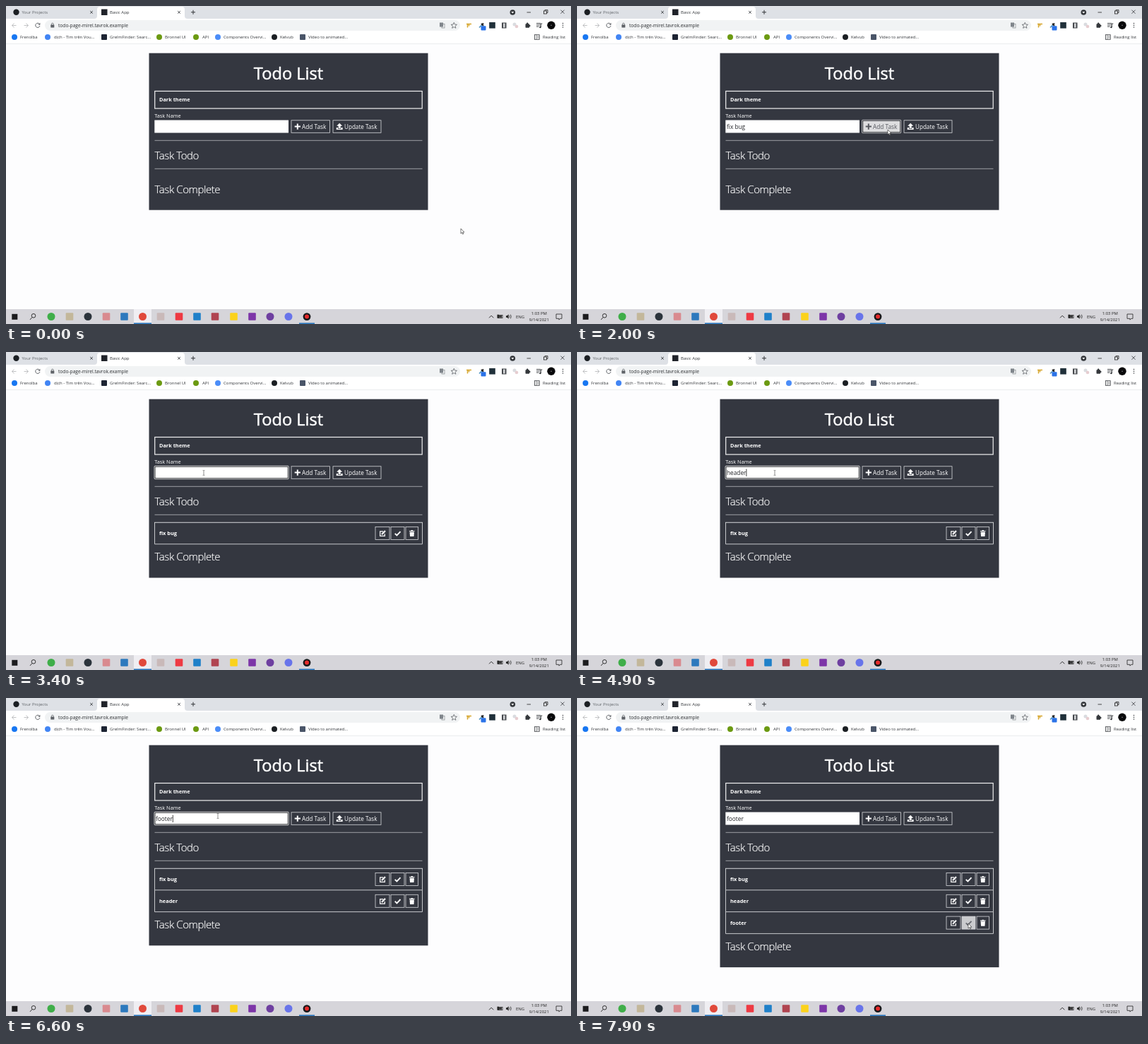
An HTML page that plays this animation: 800x450 px, repeating every 8000 ms.

```html
<!DOCTYPE html>
<html lang="en">
<head>
<meta charset="utf-8">
<title>Todo List</title>
<style>
  html, body { margin: 0; width: 100%; height: 100%; overflow: hidden; background: #fdfdfe; }
  svg { display: block; width: 800px; height: 450px; font-family: "Open Sans", "Noto Sans", sans-serif; }
  text { white-space: pre; }
  .title { font-weight: 500; stroke: #fff; stroke-width: .5; stroke-linejoin: round; }
  .heading { font-weight: 300; letter-spacing: -.4px; stroke: #fff; stroke-width: .2; }
</style>
</head>
<body>
<svg id="stage" viewBox="0 0 800 450" xmlns="http://www.w3.org/2000/svg"></svg>
<script>
const DARK = '#343740', INK = '#34373b', GREY = '#5f6368', EDGE = '#d6d8db';

const rect = (x, y, w, h, fill, more = '') =>
  `<rect x="${x}" y="${y}" width="${w}" height="${h}" fill="${fill}" ${more}/>`;
const box = (x, y, w, h, color, weight = 1, more = '') =>
  rect(x, y, w, h, 'none', `stroke="${color}" stroke-width="${weight}" ${more}`);
const dot = (x, y, r, fill, more = '') => `<circle cx="${x}" cy="${y}" r="${r}" fill="${fill}" ${more}/>`;
const line = (d, color = INK, weight = 1, more = '') =>
  `<path d="${d}" fill="none" stroke="${color}" stroke-width="${weight}" ${more}/>`;
const shape = (d, fill, more = '') => `<path d="${d}" fill="${fill}" ${more}/>`;
const text = (x, y, size, str, fill = INK, more = '') =>
  `<text x="${x}" y="${y}" font-size="${size}" fill="${fill}" ${more}>${str}</text>`;
const at = (x, y, body, more = '') => `<g transform="translate(${x} ${y})" ${more}>${body}</g>`;

const cross = (x, y, r, w = .9) => line(`M${x - r} ${y - r}l${2 * r} ${2 * r}m0 ${-2 * r}l${-2 * r} ${2 * r}`, INK, w);
const plus = (x, y, r, w) => line(`M${x - r} ${y}h${2 * r}M${x} ${y - r}v${2 * r}`, INK, w);

function browser() {
  const marks = [
    [20, 'Frenolba', '#1877f2', 12], [68, 'dịch - Tìm trên Vou...', '#4285f4', 59],
    [147, 'GrelmFinder: Searc...', '#1d2433', 139, 1], [225, 'Bronnel UI', '#6c9a12', 217],
    [278, 'API', '#6c9a12', 269], [308, 'Components Overvi...', '#4b8df8', 300],
    [388, 'Kelvub', '#1b1f23', 380], [428, 'Video to animated...', '#4a5568', 420, 1]
  ];
  const arrow = (x, s, c) => line(`M${x + 3 * s} 27.5h${-6 * s}m${3 * s} -3l${-3 * s} 3l${3 * s} 3`, c, .9);
  return rect(0, 0, 800, 18, '#dee1e6')
    + shape('M125 18Q129 18 129 14V5Q129 1 133 1H249Q253 1 253 5V14Q253 18 257 18Z', '#fff')
    + dot(14.5, 8.7, 4.2, '#1b1f23') + text(22.5, 11, 6, 'Your Projects', GREY)
    + rect(135, 4.5, 8.5, 8.5, '#20232a') + text(147, 11, 6.1, 'Basic App')
    + cross(121, 8.8, 1.8) + cross(245, 8.8, 1.8) + plus(265, 8.8, 3, 1)
    + dot(717.3, 9, 3.8, INK) + shape('M715.3 8h4l-2 2.6z', '#fff')
    + line('M737.5 9h5.5', '#222', .8) + box(761.5, 7, 4, 4, '#222', .8)
    + line('M763 7V5.6h4V9.6h-1.5', '#222', .8) + cross(788, 8.2, 2.6, .8)
    + rect(0, 18, 800, 35, '#fff')
    + rect(55, 20, 588, 15, '#f1f3f4', 'rx="7.5"')
    + arrow(11.5, 1, '#babcbe') + arrow(28.5, -1, '#babcbe')
    + line('M47.3 25.4A3.1 3.1 0 1 0 47.9 28', GREY, 1) + shape('M48.4 23.8v3h-3z', GREY)
    + rect(63.3, 26.6, 5, 4, GREY, 'rx=".6"') + line('M64.4 27v-1.4a1.4 1.4 0 0 1 2.8 0V27', GREY, .8)
    + text(74, 29.8, 6.65, 'todo-page-mirel.tavrok.example', '#2b2e31')
    + rect(614, 23.5, 5, 6, '#80868b') + box(617, 25.5, 4, 5.5, '#80868b', .7)
    + shape('M634.3 23.3l1.2 2.8 3 .2-2.3 2 .7 3-2.6-1.6-2.6 1.6.7-3-2.3-2 3-.2z', 'none', `stroke="${GREY}" stroke-width=".8"`)
    + line('M652 25.5h7M653.5 25.5v5M655.5 25.5v3', '#d6a52c', 1.5)
    + line('M670 30.5l4-4', '#4a90c2', 1.6) + line('M673 25l3 3M674 26.5l2-2', '#222', 1.8)
    + rect(672.5, 28.2, 7, 6.3, '#2b73e8', 'rx="1"')
    + rect(684.2, 23, 8.6, 8.6, '#20303a')
    + rect(702, 23.5, 6.5, 8, '#45484d') + rect(704, 24.5, 2.6, 6, '#d5d7d9')
    + dot(720, 26, 2.5, '#dadce0') + dot(723, 29, 2.3, '#e6cdd0')
    + rect(735.5, 25.2, 5.6, 5.6, INK, 'rx=".7"') + dot(738.2, 24.9, 1.3, INK) + dot(741.2, 28, 1.3, INK)
    + line('M751 24.5h6M751 26.8h6M751 29.1h3.5', INK, .9) + line('M757.3 30V25h2', INK, 1) + dot(756.4, 30, 1.2, INK)
    + dot(772, 27.3, 5.7, '#08080a') + dot(772, 27.3, .8, '#8b8b90')
    + [24.6, 27.3, 30].map(y => dot(788.5, y, .75, INK)).join('')
    + marks.map(([x, name, color, ix, square]) =>
        (square ? rect(ix - 4, 40, 8, 8, color, 'rx="1"') : dot(ix, 44, 4, color)) + text(x, 46.2, 6, name)).join('')
    + box(748.6, 40.7, 6.6, 6.6, INK, .8) + line('M751 41v6M752 42.8h2.5M752 45h2.5', INK, .6)
    + text(760, 46.2, 6, 'Reading list')
    + rect(0, 53, 800, .7, '#e3e5e8');
}

function taskbar() {
  const apps = [
    [64, '#3fae49'], [90, '#c3b79a', 1], [116, '#2c343c'], [142, '#d98a8f', 1], [167.5, '#2c79bd', 1],
    [193.5, '#e0493b'], [219, '#c9b9b9', 1], [245, '#ee3a43', 1], [270.5, '#1f80c9', 1],
    [296, '#b04450', 1], [322.5, '#fbd21b', 1], [348.5, '#7d35a8', 1], [374, '#6e3fa0'], [400, '#6874ea']
  ];
  return rect(0, 429, 800, 21, '#d6d5da')
    + rect(181, 429, 25, 21, '#efeef2') + rect(181, 448.4, 25, 1.6, '#2a76bd') + rect(415, 448.4, 22, 1.6, '#2a76bd')
    + rect(8.3, 435.8, 8, 8, '#1c1c1e')
    + dot(39, 438.3, 2.8, 'none', 'stroke="#222" stroke-width=".9"') + line('M37 440.5l-3 3.4', '#222', .9)
    + apps.map(([x, c, sq]) => sq ? rect(x - 5.3, 434.2, 10.6, 10.6, c, 'rx="1"') : dot(x, 439.5, 5.5, c)).join('')
    + dot(426, 439.6, 5.4, '#17181a') + dot(426, 439.6, 3, '#e52b2b')
    + line('M684 441.3l3.2-3.2 3.2 3.2', '#222', .9)
    + box(697, 437.4, 6, 4, '#222', .8) + rect(698, 438.2, 4, 2.4, '#222') + rect(695.5, 436.7, 2.4, 5, '#222')
    + shape('M708 438.2h1.6l2-1.9v6.4l-2-1.9h-1.6z', '#222')
    + line('M712.8 437.8q1.2 1.7 0 3.4M714.3 436.6q2.2 2.9 0 5.8', '#222', .7)
    + text(722, 441.8, 6, 'ENG', '#222')
    + text(754.8, 437.2, 5.9, '1:03 PM', '#222', 'text-anchor="middle"')
    + text(754.8, 446.3, 5.9, '9/14/2021', '#222', 'text-anchor="middle"')
    + line('M779 436h8v6.3h-2.4l-1.6 1.8v-1.8h-4z', '#222', .8);
}

const ROW = 30.8;
const icons = {
  edit: line('M1 -2.8h-4.3v6.6h6.6V.6', '#fff', 1.2) + line('M-1 1.5L4 -3.5', '#fff', 2.2),
  check: line('M-3.8 .2l2.7 2.7L4 -2.4', 'currentColor', 1.9),
  trash: shape('M-3.7 -3.7h2.3l.5-.8h1.8l.5.8h2.3v1.2h-7.4zM-3.2 -1.9h6.4l-.5 6.4h-5.4z', '#fff')
};

function taskRow(name, i) {
  const btn = (x, w, icon) => box(x, 247.5, w, 18, EDGE, .8) + at(x + w / 2, 256.6, icons[icon]);
  return `<g id="row${i}" transform="translate(0 ${i * ROW})">`
    + (i ? '' : line('M210 241.2H590', EDGE, 1.1))
    + line('M210.5 241V271.8H589.5V241', EDGE, .9)
    + text(217, 259.4, 7.4, name, '#fff', 'font-weight="700"')
    + btn(523, 20, 'edit')
    + `<g id="check${i}" color="#fff">` + rect(545, 247.5, 19, 18, '#fff', 'fill-opacity="0"') + btn(545, 19, 'check') + '</g>'
    + btn(566, 17.5, 'trash') + '</g>';
}

function app() {
  const ring = (id, x, w, color) => `<g id="${id}">`
    + box(x - .2, 161.3, w + .4, 18.4, color, .9, 'rx="1"') + box(x + .7, 162.2, w - 1.4, 16.6, '#15171b', .9) + '</g>';
  const white = '#fff';
  return rect(202.5, 66.7, 395, 222, DARK, 'id="panel"')
    + text(400, 103.6, 23.6, 'Todo List', white, 'class="title" text-anchor="middle"')
    + box(210.7, 120.5, 378.5, 24.5, '#f0f0f1', 1.2)
    + text(217, 135.3, 7.35, 'Dark theme', white, 'font-weight="700"')
    + text(210.3, 158.2, 7.35, 'Task Name', white)
    + rect(210.3, 161.5, 189.7, 18, white)
    + text(212, 173.7, 8.3, '', '#24262a', 'id="entry"')
    + rect(0, 165.5, .8, 10.5, '#111', 'id="caret"')
    + '<g id="add" color="#fff">' + rect(404, 161.8, 54.5, 17.5, white, 'fill-opacity="0"')
    + box(404, 161.8, 54.5, 17.5, EDGE, .8)
    + line('M408.7 170.6h8.2M412.8 166.5v8.2', 'currentColor', 2)
    + text(419, 173.8, 8.25, 'Add Task', 'currentColor') + '</g>'
    + box(463, 161.8, 68, 17.5, EDGE, .8)
    + shape('M472.2 165.8l4 4h-2.5v3.1h-3v-3.1h-2.5zM467.8 172h2.2v1.7h4.4V172h2.2v3h-8.8z', white)
    + text(479, 173.8, 8.15, 'Update Task', white)
    + ring('ringInput', 210.3, 189.7, white) + ring('ringAdd', 404, 54.5, '#c9cbcf')
    + line('M210.5 190.3H589.5M210.5 230.3H589.5', '#a9abaf', .9)
    + text(210.5, 216.7, 15, 'Task Todo', white, 'class="heading"')
    + ['fix bug', 'header', 'footer'].map(taskRow).join('')
    + text(210.5, 264.6, 15, 'Task Complete', white, 'id="done" class="heading"');
}

const pointer = '<g id="cursor">'
  + shape('M0 0v7l1.6-1.5 1.1 2.4 1.1-.5-1.1-2.3h2.2z', '#fff', 'id="arrow" stroke="#222" stroke-width=".6"')
  + line('M-1.4 -3.4h1l.4.4.4-.4h1M0 -3v6M-1.4 3.4h1l.4-.4.4.4h1', '#444', .6, 'id="beam"') + '</g>';

const stage = document.getElementById('stage');
stage.innerHTML = browser() + app() + taskbar() + pointer;
const $ = id => document.getElementById(id);

// Timelines: [ms, value...]
const LOOP = 8000, STEP = 100;
const path = [
  [0, 644, 315], [500, 330, 172], [1500, 330, 172], [1800, 428, 174], [2000, 440, 175], [2200, 440, 176],
  [2400, 470, 192], [2900, 286, 172], [3100, 286, 172], [3400, 280, 171], [5000, 280, 171], [5200, 430, 173],
  [5300, 420, 172], [5400, 336, 168], [5600, 300, 167], [6800, 300, 167], [7100, 436, 174], [7300, 440, 175],
  [7600, 642, 285], [7700, 603, 305], [7900, 554, 319]
];
const addGlow = [
  [1700, 0], [2000, .83], [2200, 1], [2300, 1], [2600, 0], [5000, 0], [5300, .9], [5400, .72],
  [5700, 0], [6900, 0], [7200, .85], [7300, 1], [7600, 0]
];
const checkGlow = [[7700, 0], [7900, .74]];
const focus = [[0, ''], [500, 'input'], [1900, 'add'], [2800, 'input'], [5200, 'add'], [5600, 'input'], [7100, 'add'], [7600, '']];
const counts = [[0, 0], [2100, 1], [5300, 2], [7300, 3]];
const typed = (word, times) => times.map((t, i) => [t, word.slice(0, i + 1)]);
const edits = [
  [0, ''], ...typed('fix bug', [700, 800, 900, 1100, 1200, 1300, 1400]),
  [3100, ''], ...typed('header', [3800, 4000, 4200, 4400, 4700, 4800]),
  [6000, ''], ...typed('footer', [6100, 6200, 6300, 6400, 6500, 6600])
];

const last = (table, t) => table.filter(k => k[0] <= t).pop();
function tween(table, t) {
  const n = table.findIndex(k => k[0] > t);
  if (n === 0) return table[0].slice(1);
  if (n < 0) return table[table.length - 1].slice(1);
  const [a, b] = [table[n - 1], table[n]], p = (t - a[0]) / (b[0] - a[0]);
  return a.slice(1).map((v, i) => v + (b[i + 1] - v) * p);
}
const show = (id, on) => $(id).setAttribute('visibility', on ? 'visible' : 'hidden');
const mix = p => `rgb(${[52, 55, 64].map(c => Math.round(255 + (c - 255) * p))})`;
function glow(id, p) {
  $(id).setAttribute('color', mix(p));
  $(id).firstChild.setAttribute('fill-opacity', p);
}

function draw(t) {
  const [x, y] = tween(path, t);
  const inField = x > 210 && x < 400 && y > 161 && y < 180;
  $('cursor').setAttribute('transform', `translate(${x} ${y})`);
  show('arrow', !inField);
  show('beam', inField);

  const [editedAt, entry] = last(edits, t), target = last(focus, t)[1];
  $('entry').textContent = entry;
  $('caret').setAttribute('x', 212 + (entry ? $('entry').getComputedTextLength() : 0));
  show('caret', target === 'input' && (t - editedAt < 300 || (t + 400) % 1000 < 500));
  show('ringInput', target === 'input');
  show('ringAdd', target === 'add');
  glow('add', tween(addGlow, t)[0]);
  glow('check2', tween(checkGlow, t)[0]);

  const n = last(counts, t)[1];
  for (let i = 0; i < 3; i++) $('row' + i).style.display = i < n ? '' : 'none';
  $('panel').setAttribute('height', 222 + ROW * n);
  $('done').setAttribute('y', 264.6 + ROW * n);
}

const start = performance.now();
function tick(now) {
  const t = Math.max(0, now - start) % LOOP;
  draw(Math.floor(t / STEP) * STEP);
  requestAnimationFrame(tick);
}
draw(0);
requestAnimationFrame(tick);
</script>
</body>
</html>
```
